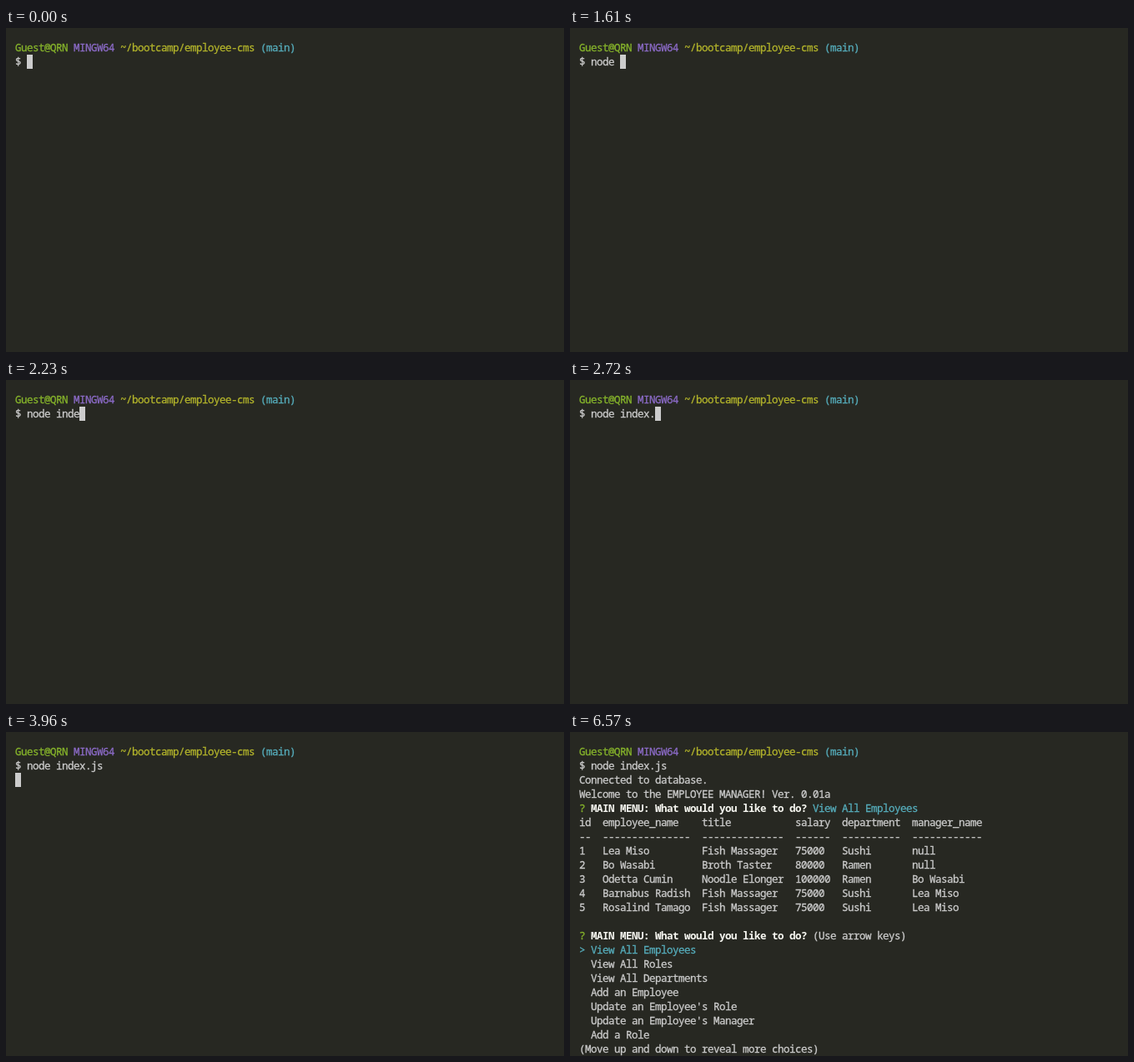
Animation, 669 px wide and 389 px high, one loop 8000 ms. Source, as an HTML page:

```html
<!DOCTYPE html>
<html lang="en">
<head>
<meta charset="utf-8">
<title>Terminal session</title>
<style>
  html, body { margin: 0; width: 100%; height: 100%; overflow: hidden; background: #272822; }
  pre {
    position: absolute; left: 11px; top: 15px; margin: 0; color: #ccc;
    font: 12.5px/17px "Noto Sans Mono", monospace;
    letter-spacing: calc(7px - 1ch); /* terminal cells are 7px wide */
    font-variant-ligatures: none;
    -webkit-text-stroke: 0.3px;
  }
  b { color: #f8f8f2; font-weight: 700; -webkit-text-stroke: 0; }
  .green { color: #86b42b; }
  .purple { color: #8c6bc8; }
  .yellow { color: #b3b42b; }
  .cyan { color: #56adbc; }
  .cursor { display: inline-block; width: 7px; height: 17px; vertical-align: top; background: #ccc; }
</style>
</head>
<body>
<pre id="terminal"></pre>
<script>
const LOOP = 8000;
const COMMAND = "node index.js";

// Each entry: [time in ms, characters typed so far]
const KEYS = [
  [0, 0], [750, 1], [870, 2], [1120, 3], [1240, 4], [1610, 5], [1860, 6],
  [1980, 8], [2230, 9], [2480, 10], [2720, 11], [2970, 12], [3090, 13]
];
const ENTER = 3960, MENU = 4330, TABLE = 6570;

const paint = (color, text) => `<span class="${color}">${text}</span>`;
const cursor = paint("cursor", "");

const prompt = [
  paint("green", "Guest@QRN"), paint("purple", "MINGW64"),
  paint("yellow", "~/bootcamp/employee-cms"), paint("cyan", "(main)")
].join(" ") + "\n$ ";

const welcome = "Connected to database.\nWelcome to the EMPLOYEE MANAGER! Ver. 0.01a\n";
const question = paint("green", "?") + " <b>MAIN MENU: What would you like to do?</b> ";
const choice = "View All Employees";
const menu = [
  question + "(Use arrow keys)",
  paint("cyan", "&gt; " + choice),
  "  View All Roles",
  "  View All Departments",
  "  Add an Employee",
  "  Update an Employee's Role",
  "  Update an Employee's Manager",
  "  Add a Role",
  "(Move up and down to reveal more choices)"
].join("\n");

const widths = [2, 15, 14, 6, 10, 12];
const rows = [
  ["id", "employee_name", "title", "salary", "department", "manager_name"],
  widths.map(n => "-".repeat(n)),
  ["1", "Lea Miso", "Fish Massager", "75000", "Sushi", "null"],
  ["2", "Bo Wasabi", "Broth Taster", "80000", "Ramen", "null"],
  ["3", "Odetta Cumin", "Noodle Elonger", "100000", "Ramen", "Bo Wasabi"],
  ["4", "Barnabus Radish", "Fish Massager", "75000", "Sushi", "Lea Miso"],
  ["5", "Rosalind Tamago", "Fish Massager", "75000", "Sushi", "Lea Miso"]
];
const table = rows
  .map(row => row.map((cell, i) => cell.padEnd(widths[i])).join("  "))
  .join("\n");

function render(t) {
  if (t < ENTER) {
    const [, typed] = KEYS.findLast(([time]) => time <= t);
    return prompt + COMMAND.slice(0, typed) + cursor;
  }
  const entered = prompt + COMMAND + "\n";
  if (t < MENU) return entered + cursor;
  if (t < TABLE) return entered + welcome + menu;
  return entered + welcome + question + paint("cyan", choice) + "\n" + table + "\n\n" + menu;
}

const terminal = document.getElementById("terminal");
let shown = "";
function tick() {
  const html = render(performance.now() % LOOP);
  if (html !== shown) terminal.innerHTML = shown = html;
  requestAnimationFrame(tick);
}
tick();
</script>
</body>
</html>
```
